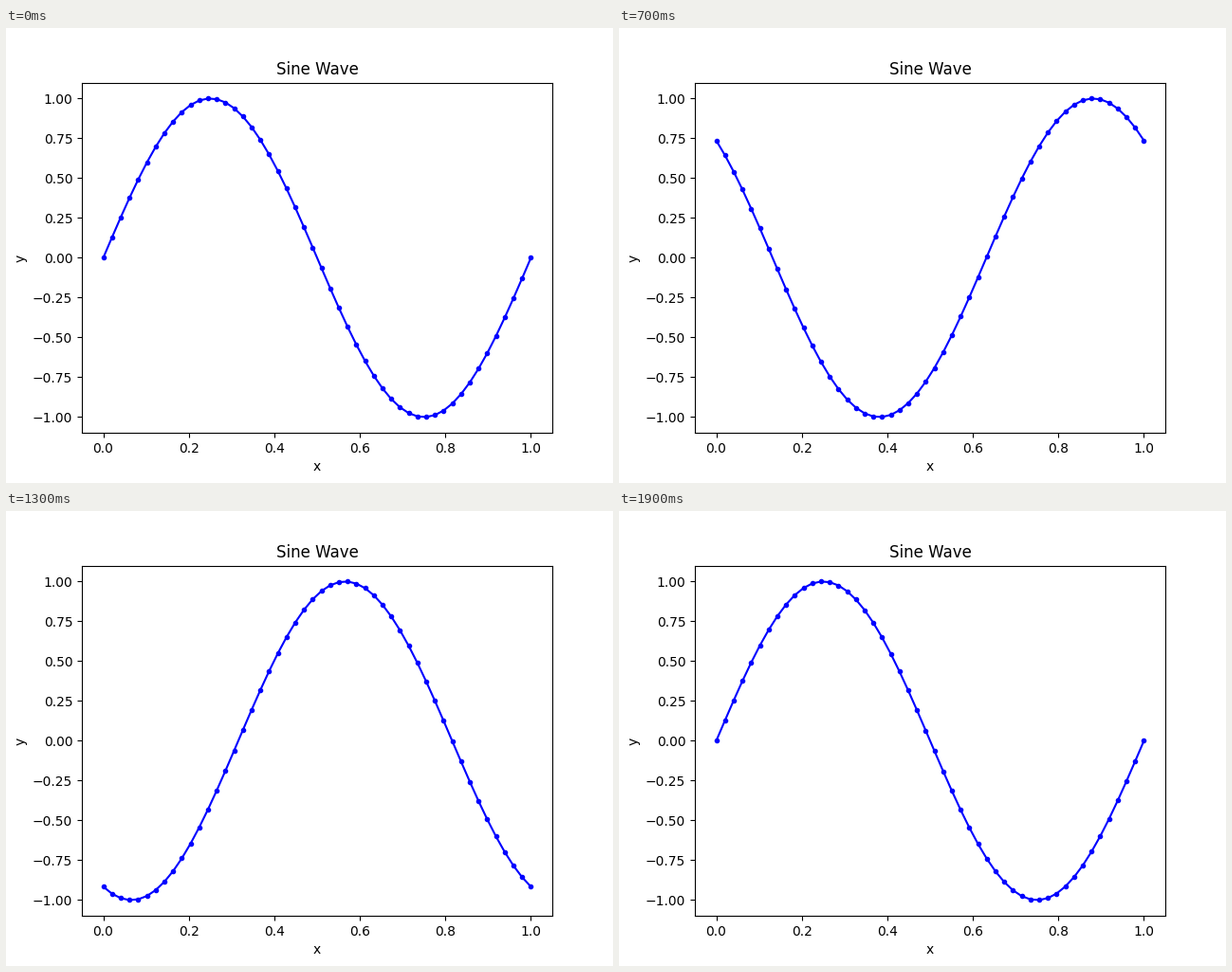
Animation, 640 px wide and 480 px high, one loop 2 s. Source, as a matplotlib script:

```python
import numpy as np
import matplotlib.pyplot as plt
from matplotlib.animation import FuncAnimation

FRAMES = 20
INTERVAL = 100

x = np.linspace(0, 1, 50)
phases = np.linspace(0, 2 * np.pi, FRAMES)


def wave(phase):
    return np.sin(2 * np.pi * x + phase)


fig, ax = plt.subplots(figsize=(6.4, 4.8), dpi=100)
line, = ax.plot(x, wave(0), "b.-")
ax.set_title("Sine Wave")
ax.set_xlabel("x")
ax.set_ylabel("y")


def update(i):
    line.set_ydata(wave(phases[i]))
    return line,


anim = FuncAnimation(fig, update, frames=FRAMES, interval=INTERVAL,
                     repeat=True, repeat_delay=0)
plt.show()
```
